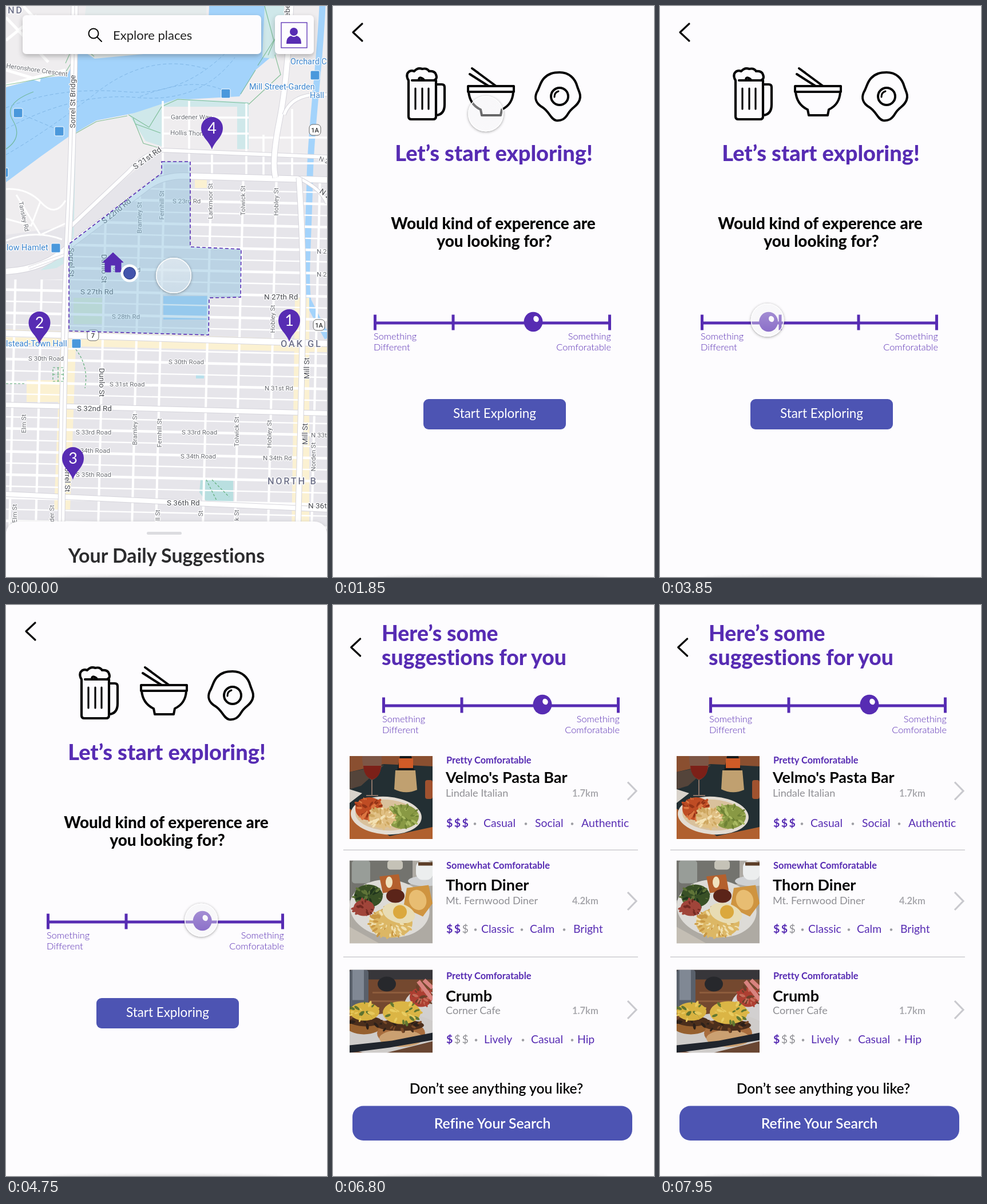
These frames come from a looping animation (561 by 998 pixels, 8000 ms). An HTML page:

```html
<!DOCTYPE html>
<html lang="en">
<head>
<meta charset="utf-8">
<style>
html, body { margin: 0; width: 100%; height: 100%; overflow: hidden; background: #fdfcfe; }
svg { display: block; width: 100%; height: 100%; }
text { font-family: Lato, sans-serif; font-variant-ligatures: none; }
.map text { font-family: Roboto, sans-serif; paint-order: stroke; stroke: #fff; stroke-width: 2.5px; stroke-linejoin: round; }
.map .plain { stroke: none; }
.map .area { letter-spacing: 2.6px; }
</style>
</head>
<body>
<svg id="stage" viewBox="0 0 561 998">
  <defs>
    <filter id="soft" x="-20%" y="-40%" width="140%" height="200%"><feDropShadow dx="0" dy="4" stdDeviation="4" flood-color="#333" flood-opacity=".32"/></filter>
    <filter id="touch" x="-30%" y="-30%" width="160%" height="160%"><feDropShadow dx="0" dy="1" stdDeviation="2" flood-color="#333" flood-opacity=".5"/></filter>
    <filter id="blur" x="-20%" y="-200%" width="140%" height="500%"><feGaussianBlur stdDeviation="3"/></filter>
    <filter id="photo"><feGaussianBlur stdDeviation=".7"/></filter>
    <linearGradient id="glass" x2="0" y2="1"><stop offset="0" stop-color="#f4f4f6" stop-opacity=".55"/><stop offset="1" stop-color="#f0f0f2" stop-opacity=".3"/></linearGradient>
    <clipPath id="city"><path d="M112 418 272 302 561 300V998H0V478H112Z"/></clipPath>
    <clipPath id="pic"><rect width="145" height="145"/></clipPath>
    <mask id="ring" maskUnits="userSpaceOnUse" x="-40" y="-40" width="80" height="80"><rect x="-40" y="-40" width="80" height="80" fill="#fff"/><circle r="30" fill="#000"/></mask>
  </defs>
</svg>
<script>
const PURPLE = '#572cb3', BLUE = '#4d54b3', INK = '#050505', PAPER = '#fdfcfe';
const stage = document.getElementById('stage');

const path = (d, stroke, w = 2, more = '') => `<path d="${d}" fill="none" stroke="${stroke}" stroke-width="${w}" ${more}/>`;
const fill = (d, c, more = '') => `<path d="${d}" fill="${c}" ${more}/>`;
const rect = (x, y, w, h, c, r = 0, more = '') => `<rect x="${x}" y="${y}" width="${w}" height="${h}" rx="${r}" fill="${c}" ${more}/>`;
const dot = (x, y, r, c, more = '') => `<circle cx="${x}" cy="${y}" r="${r}" fill="${c}" ${more}/>`;
const oval = (x, y, rx, ry, a, c) => `<ellipse cx="${x}" cy="${y}" rx="${rx}" ry="${ry}" fill="${c}" transform="rotate(${a} ${x} ${y})"/>`;
const text = (s, x, y, size, c = INK, weight = 400, more = '') => `<text x="${x}" y="${y}" font-size="${size}" fill="${c}" font-weight="${weight}" ${more}>${s}</text>`;
const group = (s, more) => `<g ${more}>${s}</g>`;
const at = (x, y, s) => group(s, `transform="translate(${x} ${y})"`);
const MID = 'text-anchor="middle"', END = 'text-anchor="end"', ROUND = 'stroke-linecap="round" stroke-linejoin="round"';

// Map
function land() {
  const water = '#a3d3fb', park = '#cfe8ea', green = '#5fae78';
  let s = rect(0, 0, 561, 998, '#e6e5ea') +
    fill('M0 0H561V270L270 250 110 385 0 400Z', '#efedef') +
    fill('M355 0H472L468 85 436 112 408 158 300 164 252 182 210 190 158 200 110 228 62 262 0 308V142L60 126 106 122 130 76 155 88 240 78 352 84Z', water) +
    fill('M215 190 252 178 300 162 424 168V250H404V176H274V246L244 236Z', park) +
    fill('M140 0H350L352 84H240L155 92 130 76Z', '#e4ebec') +
    fill('M452 0H486V62L468 92 448 90Z', park) +
    fill('M106 420 90 440 60 462 88 458 112 444ZM112 230 103 420H118L122 230Z', park) +
    path('M553 0C548 110 533 210 531 300C529 400 522 480 528 515Q545 550 562 580', water, 11) +
    path('M0 60 52 18 106 84M0 20 74 98M30 0 84 58M60 130 0 112M0 138 62 122 104 112', '#fff', 5) +
    path('M0 320Q38 318 62 344T104 340M18 330 60 400 104 380M0 372 44 384 60 342M0 410Q50 390 98 408', '#fff', 3) +
    path('M0 138Q60 128 104 116L132 70 154 88M212 192 158 202 112 228M214 190 250 212 272 176 300 163 424 170M222 196 240 240 268 248M226 206 270 222M452 0 468 60 440 104M486 20 458 86M436 112 410 154M470 85 480 120 424 172M140 20 104 100M0 250Q30 230 12 200T48 150', green, 1.2, 'opacity=".7"') +
    path('M0 178Q90 140 210 150T420 40M0 215Q120 150 230 160T400 90M22 187 95 218M0 260Q70 220 160 150T350 110M385 150Q330 120 230 160', '#7fb6e6', 1, 'stroke-dasharray="6 4"');

  // Shops and parks under the street grid
  s += fill('M0 565 561 584V605L0 592ZM505 510H530V998H498ZM95 595H122L112 880H84ZM36 654H100V692H36ZM330 300H351V318H330Z', '#fbf1d2') +
    rect(118, 510, 50, 46, '#e2ecd0') + rect(275, 507, 77, 41, water) +
    fill('M340 828H397V866H350L338 850Z', '#b9dfe0') + rect(332, 643, 14, 8, '#b8e0ec');
  let grid = '';
  for (let k = -1; k < 33; k++) {
    const y = 320 + 20.2 * k;
    grid += path(`M0 ${y - 6}L561 ${y + 6}`, '#fff', k % 2 ? 4.5 : 2.4);
  }
  for (const x of [18, 64, 173, 232, 274, 356, 412, 470, 546])
    grid += path(`M${x + 3} 290L${x - 14} 998`, '#fff', 4);
  s += group(grid, 'clip-path="url(#city)"');

  const road = (d, w) => path(d, '#d5d4db', w + 2) + path(d, '#fff', w);
  s += path('M274 195H424M274 223H424M274 166V298M320 166V298M360 192V298M420 170V298M424 230H561M270 275H561M450 225V300M500 180V300', '#fff', 3.5) +
    road('M0 572 561 590', 10) + road('M0 697 561 712', 8) + road('M0 853 561 880', 8) +
    road('M110 388 214 290Q245 255 275 252L561 264', 6) +
    road('M0 464Q70 460 112 418L250 314Q275 297 310 297L561 304', 10) + road('M40 458 112 432', 4) +
    road('M498 -5Q492 130 478 200T471 300', 9) + road('M561 155Q500 150 486 190', 5) + road('M510 300Q552 320 561 345', 5) +
    road('M512 300Q520 420 519 520T508 1000', 9) +
    road('M120 0Q119 200 109 400T96 1000', 11) + path('M120 0Q119 200 109 400T96 1000', '#d5d4db', 1) +
    path('M122 600Q145 630 138 668M0 660H34M82 632H100V656H82ZM82 644H100M91 632V656M350 828 368 864M360 828 390 858', green, 1.2, 'stroke-dasharray="4 3"');
  return s;
}

function labels() {
  const GREY = '#6b6d74', DARK = '#4a4c52', SKY = '#3a83cc';
  let s = '';
  const flat = (list, size, c, w = 400, more = '') => { for (const [t, x, y, r = 0] of list) s += text(t, x, y, size, c, w, `transform="rotate(${r} ${x} ${y})" ${more}`); };
  const tall = (list, size, c, r) => { for (const [t, x, y] of list) s += text(t, x, y, size, c, 400, `${MID} dominant-baseline="central" transform="rotate(${r} ${x} ${y})"`); };
  flat([['Gardener Way', 288, 198], ['Hollis Thornlane', 287, 225, 2], ['S 23rd Rd', 291, 345], ['S 26th Rd', 186, 465], ['S 28th Rd', 185, 547],
    ['S 30th Road', 39, 620], ['S 30th Road', 284, 626], ['S 31st Road', 181, 665], ['N 31st Rd', 452, 672], ['S 33rd Road', 122, 749],
    ['S 33rd Road', 307, 749], ['S 34th Road', 120, 781], ['S 34th Road', 305, 791], ['N 34th Rd', 449, 794], ['S 35th Road', 122, 823],
    ['N 25t', 543, 433], ['N 26t', 543, 473], ['N 33t', 533, 754], ['N 2', 546, 270, 20], ['Heronshore Crescent', 0, 108, 8]], 11.5, GREY);
  flat([['S 21st Rd', 226, 286, -35], ['S 22nd Rd', 172, 381, -39], ['S 27th Rd', 130, 504], ['N 27th Rd', 451, 513], ['S 32nd Rd', 124, 708],
    ['S 36th Rd', 281, 873], ['N 36t', 528, 878], ['N 2', 547, 326, 35]], 13.5, DARK);
  tall([['Bramley St', 233, 370], ['Fernhill St', 272, 348], ['Larkmoor St', 357, 341], ['Tolwick St', 414, 340], ['Hobley St', 472, 342],
    ['Hobley St', 466, 547], ['Bramley St', 225, 740], ['Fernhill St', 268, 746], ['Tolwick St', 403, 744], ['Hobley St', 460, 748],
    ['Norden St', 537, 788], ['Elm St', 31, 730], ['Elm St', 15, 887], ['der St', 80, 887], ['ll St', 265, 890], ['St', 340, 887], ['k St', 403, 890]], 11.5, GREY, -90);
  tall([['Tansley Rd', 31, 368]], 11, GREY, 78);
  tall([['Sorrel St Bridge', 116, 167], ['Mill St', 525, 633], ['Mill St', 522, 748], ['ebe', 491, 8]], 13.5, DARK, -90);
  tall([['Sorrel St', 115, 448], ['Dunlo St', 172, 459], ['Dunlo St', 168, 658], ['Sorrel St', 108, 824]], 13.5, DARK, 90);
  flat([['Orchard C', 497, 102], ['Mill Street-Garden', 425, 146], ['Hall', 531, 161], ['low Hamlet', 1, 427], ['lstead-Town Hall', 0, 595]], 14.4, SKY);
  flat([['OAK GL', 480, 596], ['NORTH B', 457, 836], ['ND', 3, 13]], 16.5, '#70738b', 500, 'class="area"');
  const stop = (x, y) => { s += rect(x - 8, y - 8, 16, 16, '#4a98dc', 2, 'stroke="#fff"'); };
  [[540, 121], [87, 423], [123, 590], [21, 187], [93, 219], [384, 153], [-4, 291]].forEach(p => stop(...p));
  const sign = (t, x, y) => { s += rect(x - 10, y - 10, 20, 19, '#fff', 6, 'stroke="#666"') + text(t, x, y + 4, 11, '#333', 500, MID); };
  sign('1A', 540, 217); sign('1A', 547, 558); sign('7', 152, 576);
  return s;
}

function mapScreen() {
  const zone = 'M272 272H322V421L411 425 410 509 355 510 354 575 110 568V416L272 292Z';
  const pin = (n, x, y) => at(x, y, fill('M0 38C-4 23-19 17-19 0A19 19 0 0 1 19 0C19 17 4 23 0 38Z', PURPLE) + text(n, 0, 9.5, 27, '#fff', 400, `${MID} class="plain" style="font-family:Lato,sans-serif"`));
  return group(land() + labels() +
      fill(zone, '#86bcdc', 'fill-opacity=".45"') + path(zone, PURPLE, 1.6, 'stroke-dasharray="6 4"') +
      pin(4, 360, 213) + pin(1, 495, 549) + pin(2, 58.5, 553) + pin(3, 117, 790), 'class="map"') +
    fill('M187 431 205 448H201V463Q201 465 199 465H191V453H183V465H175Q173 465 173 463V448H169Z', PURPLE, `stroke="${PURPLE}" stroke-linejoin="round"`) +
    dot(216, 467, 15.5, '#fff') + dot(216, 467, 10.5, '#4354ac', 'stroke="#263b82"') +
    rect(29, 16, 417, 68, PAPER, 7, 'filter="url(#soft)"') + rect(470, 16, 68, 68, PAPER, 7, 'filter="url(#soft)"') +
    `<circle cx="153" cy="48" r="8.5" fill="none" stroke="${INK}" stroke-width="2"/>` + path('M159 54 167 62', INK, 2, ROUND) +
    text('Explore places', 187, 58.5, 22, '#222') +
    rect(481, 29, 45, 44, 'none', 0, `stroke="${PURPLE}" stroke-width="1.3"`) + dot(503, 45, 7, PURPLE) + fill('M490 66Q490 54 498 52Q503 56 508 52Q516 54 516 66Z', PURPLE) +
    rect(0, 901, 561, 120, PAPER, 22, 'filter="url(#soft)"') + rect(246, 919, 61, 5, '#dcdce0', 2.5) +
    text('Your Daily Suggestions', 280.5, 973, 34, '#2c2c2e', 700, MID) + homeShade();
}

const homeShade = () => `<ellipse cx="278" cy="1002" rx="205" ry="4" fill="#888" opacity=".55" filter="url(#blur)"/>`;
const back = (x, y) => path(`M${x + 16} ${y - 15} ${x} ${y} ${x + 16} ${y + 15}`, INK, 3.2, ROUND);
const slider = id => rect(71, 551.5, 415, 5, PURPLE) + [71, 207.5, 344.5, 481].map(x => rect(x, 539.5, 5, 27, PURPLE)).join('') +
  text('Something', 71, 583, 16.4, PURPLE, 300) + text('Different', 71, 602, 16.4, PURPLE, 300) +
  text('Something', 486, 583, 16.4, PURPLE, 300, END) + text('Comforatable', 486, 602, 16.4, PURPLE, 300, END) +
  group(oval(0, 0, 16.5, 17.2, 0, PURPLE) + oval(5, -5, 4.6, 5.4, -25, '#fff'), `id="${id}" transform="translate(351 552)"`);

function askScreen() {
  const icons = path('M132 130V193Q132 198 137 198H175Q180 198 180 193V130H138M132 130Q128 124 130 118Q134 111 142 114Q148 107 156 110Q164 108 168 114Q178 113 180 120Q183 128 176 130M150 130Q150 122 158 128M180 137H190Q195 137 195 142V172Q195 190 180 191', INK, 4.2, ROUND) +
    path('M144 144V180M156 144V180M167 144V180', INK, 3.2, ROUND) +
    path('M236 140H316V150H236ZM237 150Q239 172 258 181L260 191H293L295 181Q314 172 315 150M239 119 272 140M243 109 285 140', INK, 4, ROUND) +
    path('M396 116C412 116 423 126 427 141C430 150 434 156 431 164C427 176 418 176 411 188C405 198 399 201 390 200C380 198 378 184 366 177C354 170 352 160 356 151C361 143 362 133 369 126C377 118 385 116 396 116Z', INK, 4) +
    `<circle cx="396" cy="158" r="15" fill="none" stroke="${INK}" stroke-width="4"/>` + path('M387 159Q387 151 394 149', INK, 3, ROUND);
  return rect(0, 0, 561, 998, PAPER) + back(35, 46) + icons +
    text('Let’s start exploring!', 281, 270.5, 38, PURPLE, 800, MID) +
    text('Would kind of experence are', 280, 390, 27.9, INK, 800, MID) + text('you looking for?', 282, 421, 27.9, INK, 800, MID) +
    slider('knob') + rect(158, 687, 249, 53, BLUE, 9) + text('Start Exploring', 282.5, 719.5, 22.4, '#fff', 400, MID) + homeShade();
}

// A heap of food: a solid base with seeded flecks on top
function heap(seed, n, cx, cy, rx, ry, colors) {
  const rnd = () => (seed = seed * 16807 % 2147483647) / 2147483647;
  let s = oval(cx, cy, rx, ry, 0, colors[0]);
  for (let i = 0; i < n; i++) {
    const a = rnd() * 6.28, d = Math.sqrt(rnd()), r = 1.4 + rnd() * 2.4;
    s += oval((cx + rx * d * Math.cos(a)).toFixed(1), (cy + ry * d * Math.sin(a)).toFixed(1), (r * 1.6).toFixed(1), (r * .7).toFixed(1), (a * 57).toFixed(), colors[i % colors.length]);
  }
  return s;
}
const photos = [
  () => rect(0, 0, 145, 145, '#232f33') + fill('M0 0H145V18L60 14 0 28Z', '#8a4f30') + fill('M0 28 60 16 20 52 0 58Z', '#54443a') + fill('M0 92V145H145V124L70 140Z', '#b0602f') + fill('M0 58 22 65 0 82Z', '#d8d2ca') +
    fill('M22 0H56Q58 36 39 42Q22 34 22 0Z', '#7d5646') + fill('M24 17H55Q54 38 39 41Q25 36 24 17Z', '#7c2018') + path('M39 42V68M29 69H50', '#8b7468', 2) +
    fill('M88 0H108L114 32H82Z', '#17191a') + rect(86, 4, 25, 17, '#cf5b27') + fill('M80 25H115L118 59Q98 68 78 58Z', '#c0a070') + rect(132, 42, 13, 33, '#a0522f', 4) +
    oval(64, 104, 62, 33, 4, '#e3dcd2') + oval(64, 103, 54, 27, 4, '#d9c19c') +
    heap(7, 55, 34, 92, 24, 20, ['#bf4c24', '#933417', '#dc7642']) + heap(23, 65, 92, 106, 29, 21, ['#899944', '#6f8235', '#aaba62']) + heap(13, 50, 56, 108, 22, 18, ['#e0bf83', '#cda65f', '#f3e2b5']),
  () => rect(0, 0, 145, 145, '#aeaaa3') + fill('M0 0H110V40L0 70Z', '#73736e') + rect(4, 0, 32, 40, '#989d98', 5) + rect(66, 0, 27, 16, '#c5c2b7', 5) + oval(132, 36, 30, 9, 0, '#cfd1d3') + rect(116, 0, 30, 34, '#eceeee', 12) + fill('M120 3H145V9H120Z', '#5b3d26') +
    oval(70, 84, 70, 50, 8, '#dddbd7') + fill('M52 28 86 24 91 52 58 57Z', '#b4602d') + oval(69, 38, 6, 10, 0, '#f0e2be') + fill('M100 48 138 43 145 75 128 98 94 82Z', '#cf9440') + oval(119, 69, 15, 18, -20, '#e8bd72') +
    heap(31, 55, 33, 62, 25, 20, ['#395026', '#20351d', '#5f7438']) + heap(43, 25, 25, 83, 18, 14, ['#a0453a', '#732a22']) +
    heap(57, 75, 72, 109, 38, 26, ['#dcb765', '#f0e0b0', '#c99845']) + oval(86, 92, 29, 17, 15, '#e8dcb4') + dot(88, 90, 12, '#dba83d') + oval(80, 62, 16, 12, 0, '#5b2419') + fill('M0 116 52 145H0Z', '#c4beb4'),
  () => rect(0, 0, 145, 145, '#74482f') + rect(0, 0, 145, 17, '#37363a') + rect(0, 0, 33, 70, '#59606b', 5) + rect(5, 0, 20, 53, '#808894') + oval(65, 25, 16, 13, 0, '#27282c') + path('M40 40H105M35 55H96', '#8d5c3c', 3) +
    oval(127, 65, 32, 30, 0, '#d2d0d0') + heap(63, 35, 125, 48, 20, 17, ['#ad3f32', '#c46b58', '#6b402a']) + path('M120 20 145 52M130 18 145 32', '#d8837f', 7) +
    oval(70, 112, 88, 36, -3, '#cfccca') + oval(25, 98, 31, 15, 0, '#96602f') + oval(90, 111, 42, 22, 0, '#a86d3e') + oval(90, 120, 38, 15, 0, '#cba071') +
    heap(71, 25, 88, 97, 42, 10, ['#4b2e1c', '#2d211a', '#7a4a28']) + heap(73, 15, 28, 90, 28, 9, ['#4b2e1c', '#2d211a']) +
    heap(83, 40, 91, 75, 33, 20, ['#dbb545', '#e9cc61', '#627832']) + heap(97, 28, 26, 73, 26, 16, ['#d8b240', '#e7c85c', '#5d7230']) +
    fill('M0 132 74 124 145 110V123L70 136 0 145Z', '#20252d') + fill('M65 145 145 125V145Z', '#694632')
];

function row(i, [top, tagY, nameY, subY, moodY, goY], kind, name, place, km, price, tags) {
  let s = at(29, top, group(group(photos[i](), 'filter="url(#photo)"'), 'clip-path="url(#pic)"')) +
    text(kind, 198, tagY, 16.4, PURPLE, 700) + text(name, 197, nameY, 27, INK, 700) +
    text(place, 197, subY, 18.1, '#8f8f94') + text(km, 418, subY, 16.5, '#a9a9ae', 700) +
    path(`M515 ${goY - 15.5} 530 ${goY} 515 ${goY + 15.5}`, '#c9c9ce', 3.2);
  for (let k = 0; k < 3; k++) s += text('$', 198 + 13.8 * k, moodY, 19.5, k < price ? PURPLE : '#8f8f94', k < price ? 700 : 400);
  for (const [t, x, dx] of tags) s += text(t, x, moodY, 19.4, PURPLE) + dot(dx, moodY - 5.5, 2.2, '#9d9da3');
  return s;
}

function listScreen() {
  return rect(0, 0, 561, 998, PAPER) + back(31.7, 74) +
    text('Here’s some', 85, 62.5, 37.3, PURPLE, 800) + text('suggestions for you', 85, 105, 37.3, PURPLE, 800) +
    at(15, -378, slider('fixed')) +
    row(0, [264, 277, 311, 335, 388, 325], 'Pretty Comforatable', 'Velmo\'s Pasta Bar', 'Lindale Italian', '1.7km', 3, [['Casual', 263, 248], ['Social', 353, 337], ['Authentic', 434, 418]]) +
    row(1, [446.5, 461, 499, 523, 573, 517.5], 'Somewhat Comforatable', 'Thorn Diner', 'Mt. Fernwood Diner', '4.2km', 2, [['Classic', 259, 249], ['Calm', 344, 330], ['Bright', 420, 404]]) +
    row(2, [637.5, 654, 693, 715, 766, 707.5], 'Pretty Comforatable', 'Crumb', 'Corner Cafe', '1.7km', 1, [['Lively', 264, 250], ['Casual', 346, 332], ['Hip', 427, 418]]) +
    rect(18, 427.5, 515, 1.4, '#c9c9ce') + rect(18, 614.5, 515, 1.4, '#c9c9ce') +
    text('Don’t see anything you like?', 285.5, 854, 24.6, INK, 600, MID) +
    rect(34, 875.5, 489, 60.5, BLUE, 19) + text('Refine Your Search', 278.5, 914.5, 24.7, '#fff', 600, MID) + homeShade();
}

stage.insertAdjacentHTML('beforeend',
  group(mapScreen(), 'id="map"') + group(askScreen(), 'id="ask"') + group(listScreen(), 'id="list"') +
  group(group(dot(0, 0, 31, '#fff', 'filter="url(#touch)"'), 'mask="url(#ring)"') + dot(0, 0, 31, 'url(#glass)') +
    '<circle r="30.3" fill="none" stroke="#fff" stroke-opacity=".75" stroke-width="1.4"/>', 'id="finger"'));

// Motion: time, x, y, radius
const keys = [
  [0, 293, 471, 31], [700, 252, 142, 31], [930, 246, 58, 31], [1080, 246, 56, 28.5], [1350, 249, 57, 31], [1850, 267, 188, 31],
  [2600, 345, 540, 31], [2900, 348, 551, 31], [3350, 348, 550, 29], [3850, 188, 549, 29], [4150, 98, 549, 29], [4270, 103, 549, 29],
  [4800, 347, 551, 29], [5150, 348, 552, 31], [5900, 302, 687, 31], [6120, 284, 712, 31], [6260, 283, 712, 28.5], [6500, 283, 712, 31], [8000, 283, 712, 31]
];
const slope = (i, c) => (keys[i + 1][c] - keys[i][c]) / (keys[i + 1][0] - keys[i][0]);
function tangent(i, c) {
  if (!i || i === keys.length - 1) return 0;
  const a = slope(i - 1, c), b = slope(i, c);
  return a * b > 0 ? 2 * a * b / (a + b) : 0;
}
function track(t, c) {
  let i = 0;
  while (i < keys.length - 2 && t >= keys[i + 1][0]) i++;
  const [a, b] = [keys[i], keys[i + 1]], d = b[0] - a[0], u = (t - a[0]) / d, v = 1 - u;
  return a[c] * (1 + 2 * u) * v * v + b[c] * u * u * (3 - 2 * u) + d * u * v * (tangent(i, c) * v - tangent(i + 1, c) * u);
}
const ease = (t, a, b) => { const u = Math.min(1, Math.max(0, (t - a) / (b - a))); return u * u * (3 - 2 * u); };

const [ask, list, finger, knob] = ['ask', 'list', 'finger', 'knob'].map(id => document.getElementById(id));
function show(el, o) {
  el.setAttribute('opacity', o);
  el.setAttribute('display', o ? 'inline' : 'none');
}
function draw(t) {
  const x = track(t, 1), y = track(t, 2), r = track(t, 3);
  show(ask, ease(t, 1080, 1400));
  show(list, ease(t, 6260, 6580));
  show(finger, 1 - ease(t, 6350, 6620));
  finger.setAttribute('transform', `translate(${x} ${y}) scale(${r / 31})`);
  const kx = t < 3350 ? 350 : t < 4800 ? x + 2 : 349;
  knob.setAttribute('transform', `translate(${kx} 552)`);
}
const start = performance.now();
function tick() {
  draw((performance.now() - start) % 8000);
  requestAnimationFrame(tick);
}
tick();
</script>
</body>
</html>
```
